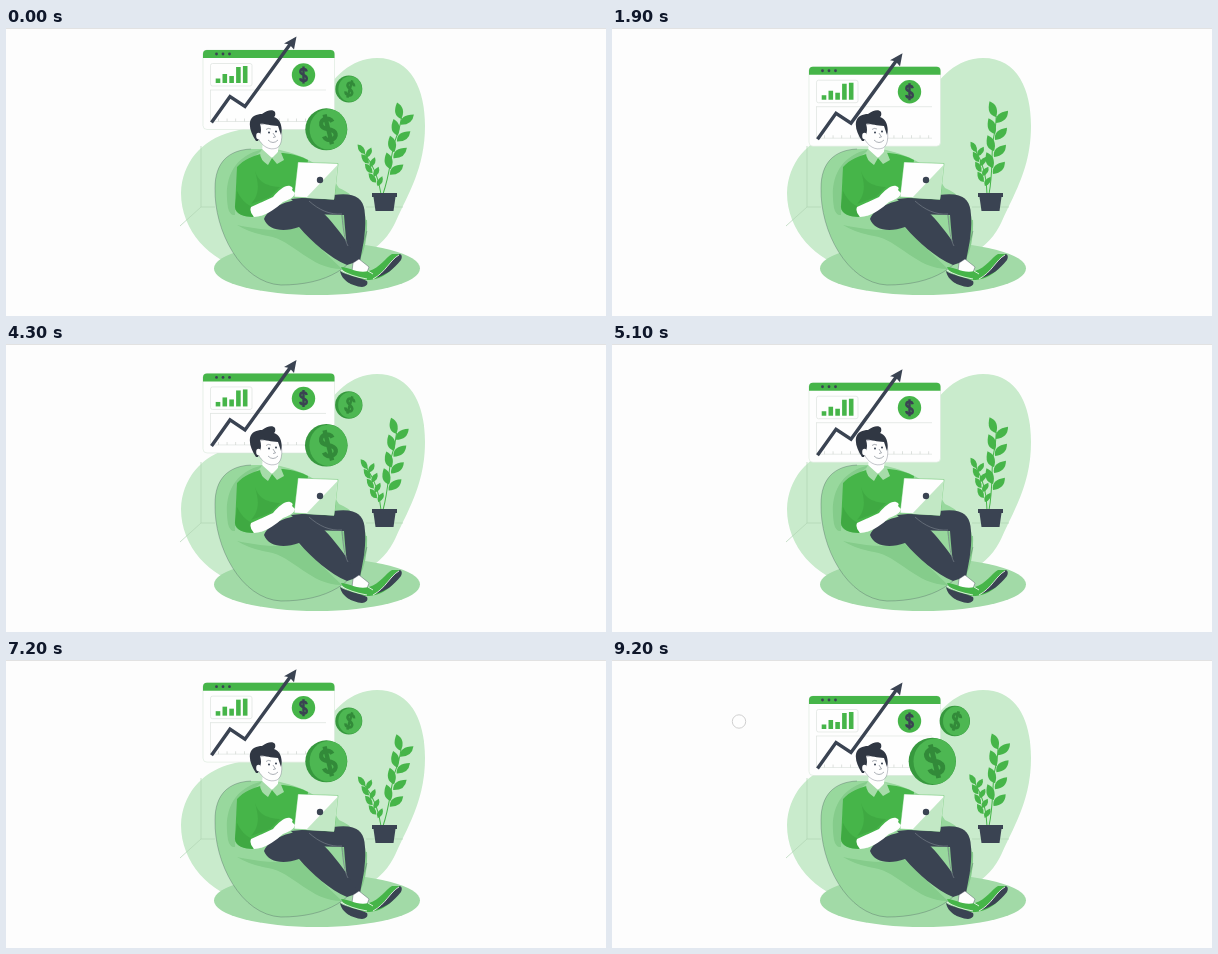
An HTML page that plays this animation: 600 by 288 pixels, repeating every 9.3 s.

```html
<!DOCTYPE html>
<html lang="en">
<head>
<meta charset="utf-8">
<title>Growing savings</title>
<style>
  html, body { margin: 0; width: 100%; height: 100%; overflow: hidden; background: #fdfdfd; }
  svg { display: block; width: 600px; height: 288px; }
  .green { fill: #46b549; }
  .dark { fill: #3a4352; }
  .white { fill: #fefefe; }
  .line { fill: none; stroke: #3a4352; stroke-width: .6; }
  .faint { fill: none; stroke: #dde3de; stroke-width: .7; }
</style>
</head>
<body>
<svg viewBox="0 0 600 288">
  <defs>
    <path id="dollar" fill="none" stroke-width="2.400" d="M3.200 -3.500C2.500 -7 -3.200 -6.800 -3.200 -3.300C-3.200 .2 3.300 -.3 3.300 3.400C3.300 6.800 -2.700 7 -3.300 3.300M0 -8.500V8.500"/>
  </defs>
  <path d="M0 .5H600" stroke="#e2e2e2"/>

  <path fill="#c9ebcc" d="M175 165C176 135 195 112 225 104C265 94 300 92 316 70C326 50 345 30 371 30C406 30 419 62 419 98C419 140 402 166 390 193C377 222 350 238 300 240H240C204 235 175 202 175 165Z"/>
  <path fill="none" stroke="#b0d4b4" stroke-width=".7" d="M195 118V179L174 198M195 179H209M360 179H397"/>
  <ellipse cx="311" cy="240.500" rx="103" ry="26.500" fill="#a2daa7"/>

  <g id="window">
    <rect x="197" y="22" width="131.500" height="79.500" rx="4" fill="#fefefe" stroke="#d9e8db" stroke-width=".6"/>
    <path class="green" d="M197 30V26Q197 22 201 22H324.500Q328.500 22 328.500 26V30Z"/>
    <g class="dark"><circle cx="210.500" cy="26" r="1.400"/><circle cx="217" cy="26" r="1.400"/><circle cx="223.500" cy="26" r="1.400"/></g>
    <rect class="faint" x="204.500" y="35.500" width="41.500" height="22.500" rx="2"/>
    <g id="bars" class="green"></g>
    <path class="faint" d="M204 62H320M204.500 62V94M206 93.500H320"/>
    <path d="M212 92H320" fill="none" stroke="#cfd5d0" stroke-width="3" stroke-dasharray=".7 8"/>
    <circle class="green" cx="297.500" cy="47" r="11.700"/>
    <use href="#dollar" x="297.500" y="47" stroke="#3a4352"/>
    <path fill="none" stroke="#3a4352" stroke-width="3.400" d="M205.500 94.500L224 68.500L239 78.500L285 15"/>
    <path class="dark" d="M290.500 8.500L278 15.500L283.500 16.500L288 21.500Z"/>
  </g>

  <g id="tall"><path fill="none" stroke="#46b549" d="M377 166C381 145 379 128 381 112Q384 98 384 88"/></g>
  <g id="short"><path fill="none" stroke="#46b549" d="M375 166Q375 142 364 123"/></g>
  <path class="dark" d="M366 165H391V169H389.500L387.500 183H369.500L367.500 169H366Z"/>

  <path fill="#98d89d" d="M209 160C209 135 222 122 245 121H268C295 125 320 138 333 160C352 168 362 185 361 203C352 240 320 257 275 257C235 255 208 203 209 160Z"/>
  <path fill="#85cc8b" d="M222 180C217 150 228 127 258 121C242 132 232 142 230 157L229 187Q224 188 222 180ZM231 197C250 201 275 205 292 199L336 241C304 241 287 212 262 208Q244 205 231 197ZM335 187L361 192Q362 215 354 232L341 216Z"/>
  <path class="line" opacity=".5" d="M361 203C352 240 320 257 275 257C235 255 208 203 209 160C209 135 222 122 245 121"/>

  <path class="green" d="M231 139C238 131 250 127 258 125H277C287 126 297 129 302 132L301 140L292 139L289 166L262 180L247 189C238 189 228 186 229 178Z"/>
  <path fill="#389e3d" opacity=".5" d="M249 143C252 153 259 158 274 159L264 169L245 176C255 165 252 154 249 143ZM231 163Q236 174 246 179L247 189Q229 188 229 178Z"/>

  <path class="dark" d="M285 171L327 167C347 164 357 169 358.500 182C361 200 357 218 354 233L343 231C340 215 339 200 338 187L300 186Z"/>
  <path class="dark" d="M258 191C263 179 281 172 300 171C316 180 336 204 353 233L341 237C324 230 306 214 293 199C277 205 262 202 258 191Z"/>
  <path fill="none" stroke="#747d87" stroke-width=".7" d="M303 173C313 182 324 187 336 186M336 187C337 202 339 213 342 218"/>

  <path class="white" stroke="#3a4352" stroke-width=".4" d="M347 235L353 231L363 239L360 247L346 243Z"/>
  <path class="green" d="M335 239C343 239 351 246 363 243C374 240 380 229 386 226H394C390 242 376 252 361 252C349 251 338 247 335 239Z"/>
  <path class="dark" d="M394 226Q397 227 395 232C387 242 380 247 369 250C380 243 385 231 394 226ZM334 243C341 248 354 249 361 253Q363 258 356 259C346 258 336 253 334 243Z"/>
  <path fill="none" stroke="#fefefe" stroke-width=".8" d="M367 251C380 244 384 232 393 227M335 242Q344 248 361 251M362 243L367 246"/>

  <path class="white" stroke="#46b549" stroke-width=".4" d="M292 134L332 135.500L328 171.500L288 169Z"/>
  <path fill="#c2e8c5" d="M331.500 137L328 171.500L300 170Z"/>
  <circle class="dark" cx="314" cy="152" r="3.200"/>
  <path class="white" d="M245 179L267 169C273 162 279 157 284 158Q288 159 286 162L289 165C288 170 282 172 277 174C268 182 258 189 248 189Q243 184 245 179Z"/>

  <path class="white" d="M257 110L273 114L272 124Q270 130 264 130L256 125Z"/>
  <path fill="#a6dca9" d="M256 121L266 130L262 137Q254 132 254 125ZM274 122L278 132L271 136L266 130Z"/>
  <path class="white" stroke="#3a4352" stroke-width=".3" d="M252 97L273 94C277 104 277 117 271 120C263 123 256 118 252 110Z"/>
  <path fill="#303743" d="M250 113C246 107 243 100 244 94C245 88 251 86 256 86C261 82 267 81 269 84Q270 88 268 89C274 91 277 98 275 107L272 98C264 98 257 95 254 96Q256 102 254 107L252 113Z"/>
  <ellipse class="white" cx="252.500" cy="108" rx="2.300" ry="3.300"/>
  <g class="dark"><circle cx="263" cy="104.500" r="1"/><circle cx="270" cy="103.500" r="1"/></g>
  <path class="line" opacity=".7" d="M260 101.500Q262 99.500 265 101M267 105L269.500 109L267 109.500M262 112Q267 117 272 112"/>

  <g id="smallCoin">
    <circle r="13.500" fill="#37983e"/><ellipse cx="1.300" rx="11.800" ry="12.800" fill="#4db752"/>
    <use href="#dollar" stroke="#328a39" transform="translate(1 0) rotate(16) scale(1.050)"/>
  </g>
  <g id="bigCoin">
    <circle r="21" fill="#37983e"/><ellipse cx="2" rx="18.700" ry="20.300" fill="#4db752"/>
    <use href="#dollar" stroke="#328a39" transform="translate(2 0) rotate(-14) scale(1.800)"/>
  </g>
  <circle id="pointer" cx="127" cy="61.500" r="6.700" fill="#fefefe" stroke="#c5c5c5" stroke-width=".8"/>
</svg>
<script>
const $ = id => document.getElementById(id);
const add = (id, markup) => $(id).insertAdjacentHTML('beforeend', markup);

[4.5, 9, 7, 16, 17].forEach((h, i) =>
  add('bars', `<rect x="${209.7 + i * 6.8}" y="${55 - h}" width="4.6" height="${h}"/>`));

function leaf(id, x, y, angle, size) {
  add(id, `<path class="green" transform="translate(${x} ${y}) rotate(${angle}) scale(${size})"
    d="M0 0Q.35 -.5 1 0Q.55 .45 0 0Z"/>`);
}
for (let i = 0; i < 4; i++) {
  const y = 89 + i * 17, x = 384 - i;
  leaf('tall', x, y, -113, 17);
  leaf('tall', x, y + 6, -46, 17);
}
for (let i = 0; i < 4; i++) {
  const y = 124 + i * 10, x = 365 + i * 2.3;
  leaf('short', x, y, -122, 12);
  leaf('short', x + 1, y + 4, -58, 11);
}

const LOOP = 9.3, PERIOD = 3.48;
// Coin scale over one period: [time, scale]
const POP = [[0, 1], [.4, 1], [.75, 1.1], [1.05, 0], [1.9, 0], [2.15, 1.14], [2.5, 1.01], [2.8, 1], [PERIOD, 1]];

function popScale(p) {
  const i = POP.findIndex(k => k[0] > p);
  const [t0, a] = POP[i - 1], [t1, b] = POP[i];
  const u = (p - t0) / (t1 - t0);
  return a + (b - a) * u * u * (3 - 2 * u);
}

function draw(t) {
  const phase = (t - .02 + PERIOD) % PERIOD;
  const lift = (1 + Math.cos(2 * Math.PI * phase / PERIOD)) / 2;
  const scale = popScale(phase);
  const set = (id, value) => $(id).setAttribute('transform', value);
  set('window', `translate(0 ${17 * (1 - lift)})`);
  set('tall', `rotate(${8.5 * lift} 377 166)`);
  set('short', `rotate(${-8 * lift} 375 166)`);
  set('bigCoin', `translate(320.3 101.3) scale(${scale})`);
  set('smallCoin', `translate(342.8 61) scale(${scale})`);
  for (const id of ['bigCoin', 'smallCoin']) $(id).style.opacity = Math.min(1, scale);
  $('pointer').style.display = t >= 8.8 ? '' : 'none';
}

function tick() {
  draw(performance.now() / 1000 % LOOP);
  requestAnimationFrame(tick);
}
tick();
</script>
</body>
</html>
```
